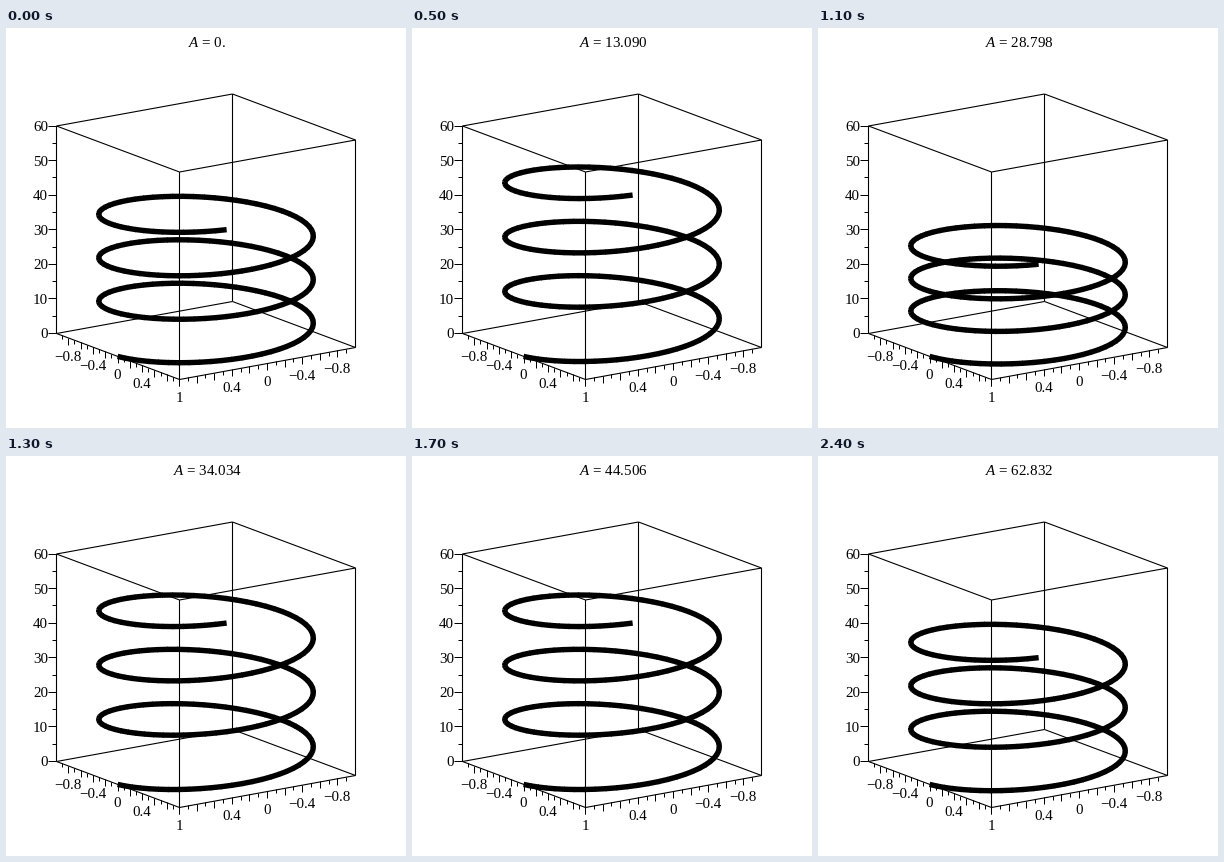
A matplotlib script that plays this animation: 400x400 px, repeating every 2500 ms.

```python
import numpy as np
import matplotlib.pyplot as plt
from matplotlib.animation import FuncAnimation
from matplotlib.collections import LineCollection

SIZE, DPI = 400, 100
FRAMES, INTERVAL = 25, 100
PX = 72 / DPI
POINTS = 200
STROKE = 5.4

plt.rcParams.update({
    "font.family": "Liberation Serif",
    "font.size": 15 * PX,
    "mathtext.fontset": "custom",
    "mathtext.it": "Liberation Serif:italic",
    "mathtext.rm": "Liberation Serif",
})

# Orthographic view: screen vectors of one unit along each axis
CENTER = np.array([200.0, 312.5])
X_AXIS = np.array([-88.0, 16.0])
Y_AXIS = np.array([61.5, 23.0])
Z_AXIS = np.array([0.0, -207.5 / 60])


def project(x, y, z):
    x, y, z = (np.asarray(v, float)[..., None] for v in (x, y, z))
    return CENTER + x * X_AXIS + y * Y_AXIS + z * Z_AXIS


def box_edges():
    ring = [(-1, -1), (1, -1), (1, 1), (-1, 1)]
    edges = []
    for (x0, y0), (x1, y1) in zip(ring, ring[1:] + ring[:1]):
        for z in (0, 60):
            edges.append([project(x0, y0, z), project(x1, y1, z)])
        edges.append([project(x0, y0, 0), project(x0, y0, 60)])
    return edges


def ticks():
    """Tick segments for the two bottom axes and the vertical one."""
    segs = []
    for i in range(-9, 11):
        drop = np.array([0, 7 if i % 2 == 0 else 4])
        for p in (project(1, i / 10, 0), project(i / 10, 1, 0)):
            segs.append([p, p + drop])
    for z in range(0, 61, 5):
        p = project(1, -1, z)
        segs.append([p, p - (8 if z % 10 == 0 else 4, 0)])
    # snapping rounds up from half pixels
    return np.array(segs) - 0.5


def label(value):
    return f"{value:g}".replace("-", "\u2212")


def draw_labels(ax):
    for v in (-0.8, -0.4, 0, 0.4, 1):
        spots = [project(1, v, 0)]
        if v != 1:
            spots.append(project(v, 1, 0))
        for px, py in spots:
            ax.text(px - 0.5, py + 22.5, label(v),
                    ha="center", va="baseline")
    for z in range(0, 61, 10):
        px, py = project(1, -1, z)
        ax.text(px - 8.5, py + 5, label(z), ha="right", va="baseline")


def helix(a):
    """Separate segments, slightly overlapping so no seams show."""
    t = np.linspace(0, 20, POINTS)
    pts = project(np.cos(t), np.sin(t), t * (2 + np.sin(a)))
    step = np.diff(pts, axis=0)
    lap = 0.4 * step / np.hypot(*step.T)[:, None]
    return np.stack([pts[:-1] - lap, pts[1:] + lap], axis=1)


def caption(a):
    if a == 0:
        value = "0."
    else:
        value = f"{a:.{4 if a < 10 else 3}f}"
    return f"$A$ = {value}"


def add_lines(ax, segs, width, **style):
    lines = LineCollection(segs, colors="black", linewidths=width * PX,
                           capstyle="butt", **style)
    ax.add_collection(lines)
    return lines


fig = plt.figure(figsize=(SIZE / DPI, SIZE / DPI), dpi=DPI, facecolor="white")
ax = fig.add_axes([0, 0, 1, 1])
ax.set(xlim=(0, SIZE), ylim=(SIZE, 0))
ax.axis("off")

add_lines(ax, box_edges(), 1.1, snap=False)
add_lines(ax, ticks(), 1, snap=True)
draw_labels(ax)
coil = add_lines(ax, helix(0), STROKE, snap=False, zorder=3)
title = ax.text(201.5, 19, caption(0), ha="center", va="baseline")


def update(i):
    a = 20 * np.pi * i / (FRAMES - 1)
    coil.set_segments(helix(a))
    title.set_text(caption(a))
    return coil, title


anim = FuncAnimation(fig, update, frames=FRAMES, interval=INTERVAL,
                     repeat=True, repeat_delay=0)
plt.show()
```
